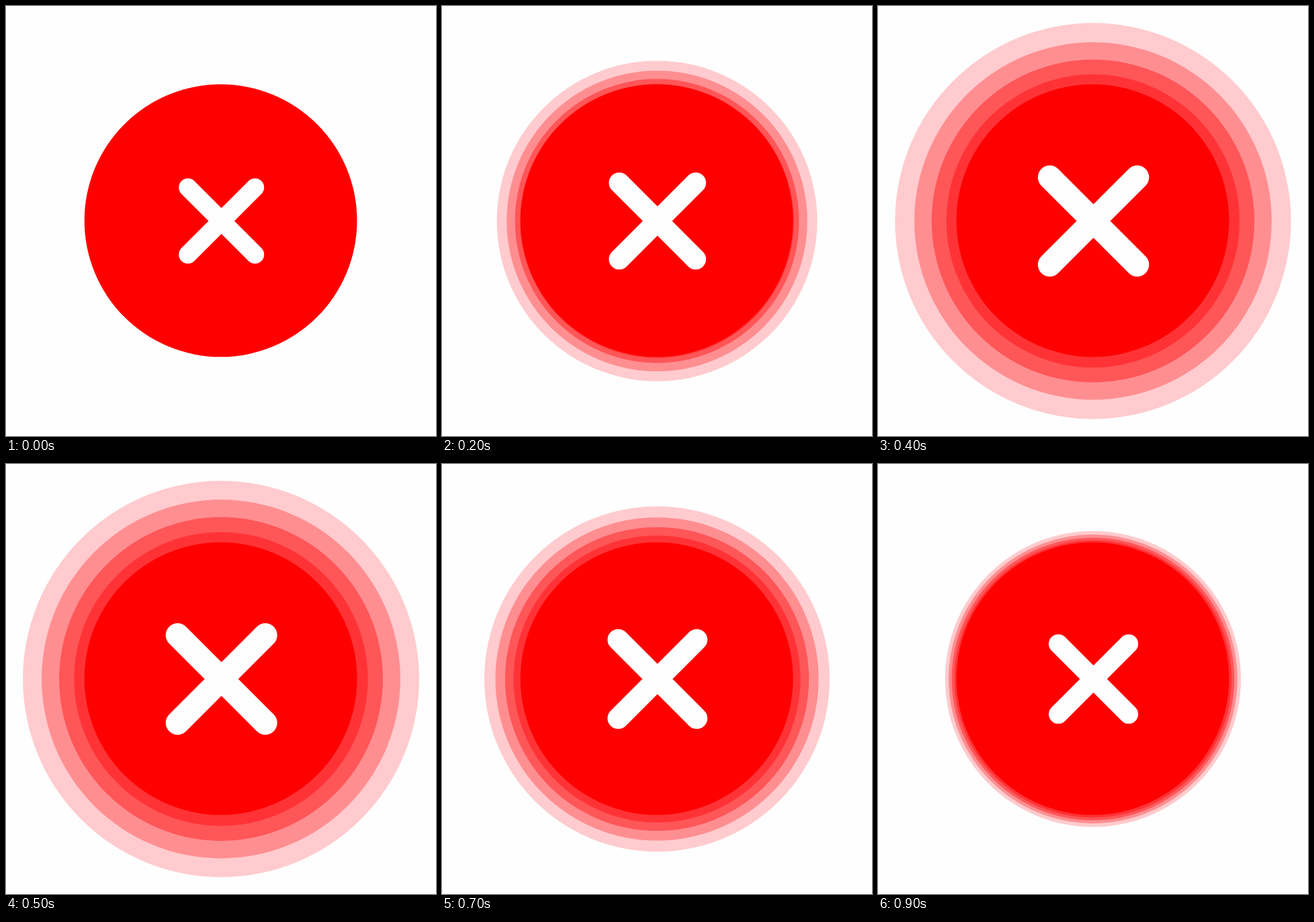
These frames come from a looping animation (640 by 640 pixels, 1 s). An HTML page with a canvas:

```html
<!DOCTYPE html>
<html lang="en">
<head>
<meta charset="utf-8">
<title>Pulsing close button</title>
<style>
  html, body { margin: 0; width: 100%; height: 100%; overflow: hidden; background: #fefefe; }
  canvas { display: block; width: 100vmin; height: 100vmin; }
</style>
</head>
<body>
<canvas id="stage" width="640" height="640"></canvas>
<script>
const ctx = document.getElementById('stage').getContext('2d');
const LOOP = 1000, STEP = 100;
const PEAK = 427, RELEASE = 500;
const WHITE = '#fefefe', RADIUS = 202.9;

// Each ring swells from its start to size, then shrinks along drop
const rings = [
  { color: '#ffcbce', start: 35, size: 93, drop: 92 },
  { color: '#ff8e91', start: 60, size: 64, drop: 64 },
  { color: '#ff5658', start: 100, size: 38, drop: 39.5 },
  { color: '#ff3336', start: 165, size: 15.7, drop: 18 }
];

function rise(t, start) {
  const u = Math.min(1, Math.max(0, (t - start) / (PEAK - start)));
  return u * u * (3 - 2 * u);
}

function fall(t, power) {
  return ((LOOP - t) / (LOOP - RELEASE)) ** power;
}

function disc(x, y, r, color) {
  ctx.fillStyle = color;
  ctx.beginPath();
  ctx.arc(x, y, r, 0, Math.PI * 2);
  ctx.fill();
}

function cross(x, y, size) {
  const cap = size * 0.214;
  const d = size - cap;
  ctx.strokeStyle = WHITE;
  ctx.lineWidth = cap * 2;
  ctx.lineCap = 'round';
  ctx.beginPath();
  for (const s of [-1, 1]) {
    ctx.moveTo(x - d, y - s * d);
    ctx.lineTo(x + d, y + s * d);
  }
  ctx.stroke();
}

function draw(now) {
  const t = Math.floor((now % LOOP) / STEP) * STEP;
  ctx.fillStyle = WHITE;
  ctx.fillRect(0, 0, 640, 640);
  for (const { color, start, size, drop } of rings) {
    const grow = Math.min(size * rise(t, start), drop * fall(t, 1.04));
    if (grow > 0) disc(320, 320, RADIUS + grow, color);
  }
  disc(319.6, 319.4, RADIUS, '#ff0000');
  cross(320.7, 320, 63.5 + 19.5 * Math.min(rise(t, 0), fall(t, 1.15)));
}

const begin = performance.now();
function tick() {
  draw(performance.now() - begin);
  requestAnimationFrame(tick);
}
tick();
</script>
</body>
</html>
```
